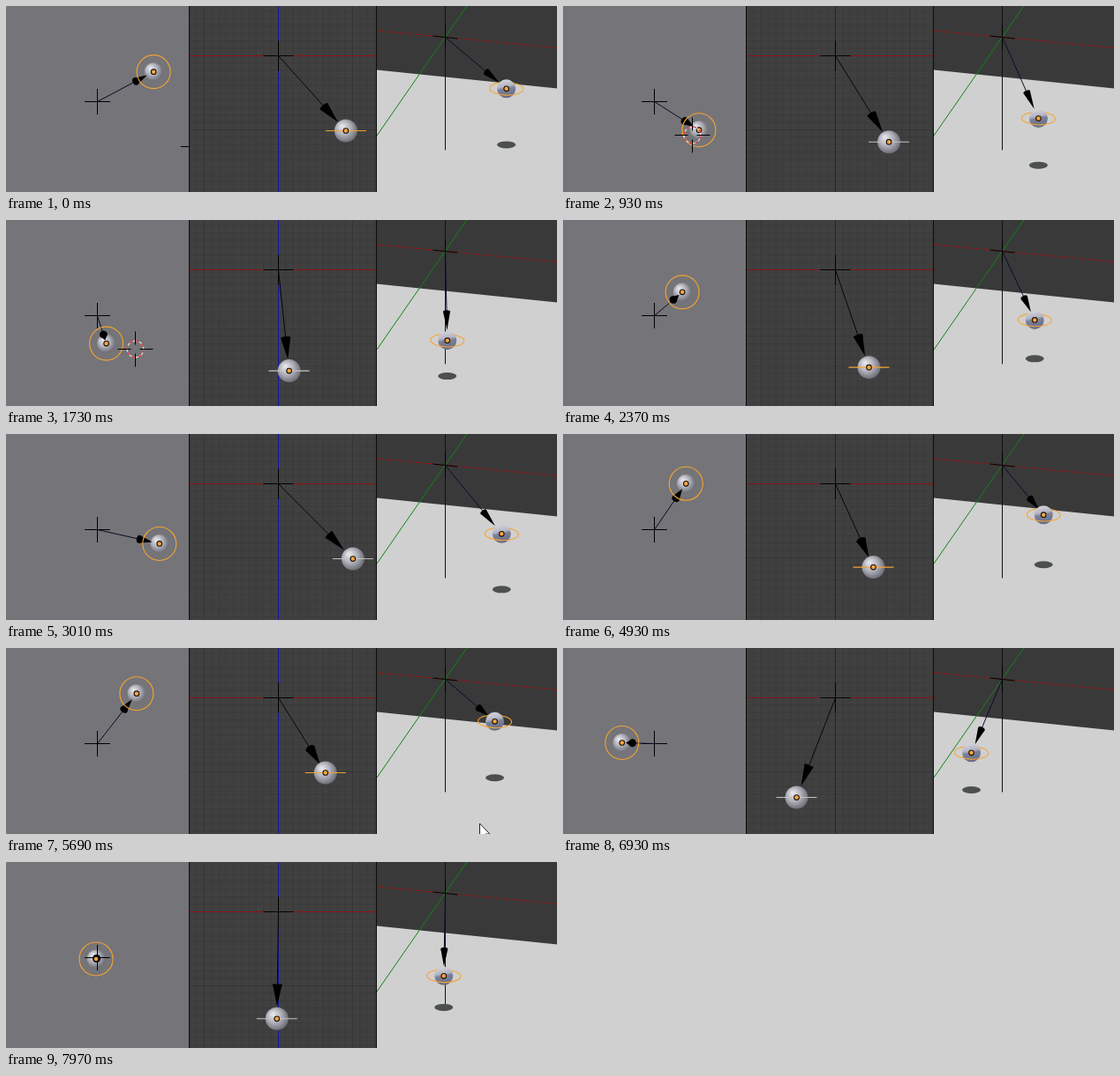
Write an HTML page with a canvas that moves like this. It is 624x211 px and loops after 8 s.

```html
<!DOCTYPE html>
<html lang="en">
<head>
<meta charset="utf-8">
<title>Precessing pendulum in three views</title>
<style>
html, body { margin: 0; width: 100%; height: 100%; overflow: hidden; background: #393939; }
canvas { display: block; }
</style>
</head>
<body>
<canvas id="stage" width="624" height="211"></canvas>
<script>
const ctx = document.getElementById('stage').getContext('2d');
const LOOP = 8000, TAU = Math.PI * 2, RAD = Math.PI / 180;
const LENGTH = 121.3, TILT = 22.75 * RAD, TOP_SCALE = 1 / 1.2;
const ORANGE = '#f5a432';

// [seconds, degrees]: heading of the tilted axis, and spin of the ball about it
const HEADING = [[.17, -28], [.6, -11], [1.1, -4], [1.73, 6], [2.45, 20], [3.01, 14.4],
  [3.6, 9], [4.17, 15], [4.75, -13], [5.14, -33], [5.69, -52], [5.97, -63],
  [6.42, -86], [6.93, -115], [7.5, -126], [7.97, -136]];
const SPIN = [[.17, 0], [1.73, -591], [3.01, -1083], [4.17, -1560], [5.69, -2160],
  [6.93, -2643], [7.97, -3057]];

// Smooth curve through keys (cubic Hermite)
function curve(keys, t) {
  const n = keys.length - 1;
  t = Math.min(Math.max(t, keys[0][0]), keys[n][0]);
  let i = 0;
  while (i < n - 1 && t > keys[i + 1][0]) i++;
  const slope = k => {
    const a = keys[Math.max(k - 1, 0)], b = keys[Math.min(k + 1, n)];
    return (b[1] - a[1]) / (b[0] - a[0]);
  };
  const [t0, v0] = keys[i], [t1, v1] = keys[i + 1];
  const d = t1 - t0, u = (t - t0) / d, w = 1 - u;
  return v0 * w * w * (1 + 2 * u) + v1 * u * u * (3 - 2 * u)
    + slope(i) * d * u * w * w - slope(i + 1) * d * u * u * w;
}

// Ball position: x right, y towards the viewer, z down
function ballAt(t) {
  const a = curve(HEADING, t) * RAD, s = curve(SPIN, t) * RAD;
  const si = Math.sin(TILT), co = Math.cos(TILT);
  const out = si * co * (1 + Math.cos(s)), side = si * Math.sin(s);
  return {
    x: LENGTH * (out * Math.cos(a) - side * Math.sin(a)),
    y: LENGTH * (out * Math.sin(a) + side * Math.cos(a)),
    z: LENGTH * (co * co - si * si * Math.cos(s))
  };
}

function line(x1, y1, x2, y2, color, width = 1, dash = []) {
  ctx.strokeStyle = color;
  ctx.lineWidth = width;
  ctx.setLineDash(dash);
  ctx.beginPath();
  ctx.moveTo(x1, y1);
  ctx.lineTo(x2, y2);
  ctx.stroke();
  ctx.setLineDash([]);
}

function poly(points, fill, stroke) {
  ctx.beginPath();
  points.forEach(p => ctx.lineTo(p[0], p[1]));
  ctx.closePath();
  ctx.fillStyle = fill;
  ctx.fill();
  if (stroke) {
    ctx.strokeStyle = stroke;
    ctx.lineWidth = 1;
    ctx.stroke();
  }
}

function oval(x, y, rx, ry, fill, stroke, turn = 0, from = 0, to = TAU) {
  ctx.beginPath();
  ctx.ellipse(x, y, rx, ry, turn, from, to);
  if (fill) { ctx.fillStyle = fill; ctx.fill(); }
  if (stroke) { ctx.strokeStyle = stroke; ctx.lineWidth = 1.1; ctx.stroke(); }
}

function cross(x, y, r, skew = 0) {
  line(x - r, y - skew, x + r, y + skew, '#000');
  line(x, y - r, x, y + r, '#000');
}

// Thin shaft and cone head; reach is the full projected length
function arrow(x, y, bx, by, w, reach, color) {
  const dx = bx - x, dy = by - y, len = Math.hypot(dx, dy) || 1;
  const ux = dx / len, uy = dy / len;
  const hx = x + dx * .676, hy = y + dy * .676;
  const flat = w * Math.sqrt(Math.max(0, 1 - (len / reach) ** 2));
  line(x, y, hx, hy, color);
  oval(hx, hy, flat, w, '#000', null, Math.atan2(dy, dx));
  poly([[hx - uy * w, hy + ux * w], [hx + uy * w, hy - ux * w],
    [x + dx * .884, y + dy * .884]], '#000');
}

function ball(x, y, r) {
  const g = ctx.createRadialGradient(x - r * .35, y - r * .4, r * .1, x - r * .1, y - r * .1, r * 1.15);
  g.addColorStop(0, '#e2e2e8');
  g.addColorStop(.5, '#b0b0ba');
  g.addColorStop(1, '#696973');
  oval(x, y, r, r, g);
}

function dot(x, y) {
  oval(x, y, 2.8, 2.8, '#f7a544', '#1a1208');
}

function panel(x, w, draw) {
  ctx.save();
  ctx.beginPath();
  ctx.rect(x, 0, w, 211);
  ctx.clip();
  draw();
  ctx.restore();
}

function cursor3d(x, y) {
  oval(x, y, 9.5, 9.5, null, '#eee');
  ctx.setLineDash([4, 3.5]);
  oval(x, y, 9.5, 9.5, null, '#d22');
  ctx.setLineDash([]);
  for (const s of [-1, 1]) {
    line(x + s * 5, y, x + s * 20, y, '#000');
    line(x, y + s * 5, x, y + s * 20, '#000');
  }
}

function topView(p, ms) {
  ctx.fillStyle = '#757478';
  ctx.fillRect(0, 0, 208, 211);
  const x = 103.5 + p.x * TOP_SCALE, y = 108.5 + p.y * TOP_SCALE;
  ball(x, y, 10.5);
  cross(103.5, 108.5, 14.5);
  arrow(103.5, 108.5, x, y, 4.5, LENGTH * TOP_SCALE, '#0a0a22');
  oval(x, y, 19, 19, null, ORANGE);
  dot(x, y);
  if (ms < 850) cursor3d(218, 159.5);
  else if (ms < 2350) cursor3d(146.5, 146.5);
}

function frontView(p) {
  ctx.fillStyle = '#404040';
  ctx.fillRect(208, 0, 212, 211);
  for (let i = -14; i < 20; i++) {
    const c = i % 10 ? '#3b3b3b' : '#363636', d = i * 8.4;
    line(308.5 + d, 0, 308.5 + d, 211, c);
    line(208, 56.5 + d, 420, 56.5 + d, c);
  }
  line(208, 56.5, 420, 56.5, '#8c1212');
  line(308.5, 0, 308.5, 211, '#1414a0');
  const x = 308.5 + p.x, y = 56.5 + p.z;
  cross(308.5, 56.5, 17);
  arrow(308.5, 56.5, x, y, 5.5, LENGTH, '#05050f');
  ball(x, y, 13);
  line(x - 23, y, x + 23, y, p.y < -4 ? ORANGE : '#c4c4c4', 1.1);
  dot(x, y);
}

function cameraView(p, ms) {
  ctx.fillStyle = '#393939';
  ctx.fillRect(420, 0, 204, 211);
  poly([[420, 72.5], [624, 93.5], [624, 211], [420, 211]], '#d0d0d0');
  const ox = 497.5, oy = 35.5, dx = p.x * TOP_SCALE, dy = p.y * TOP_SCALE;
  const x = ox + .961 * dx - .236 * dy;
  const y = oy + .77 * p.z + .09 * dx + .38 * dy;
  line(420, 28, 624, 47.5, '#941414', 1, [8, 3]);
  line(521.8, 0, 420, 147, '#148214');
  line(ox, 0, ox, 163.5, '#111');
  oval(x, 164.5 + .085 * dx + .37 * dy, 10.5, 4, '#4b504d');
  cross(ox, oy, 14, 1.5);
  arrow(ox, oy, x, y, 4, 112, '#0a0a30');
  oval(x, y, 19, 7.3, null, ORANGE, .03, Math.PI, TAU);
  const g = ctx.createLinearGradient(x - 2, y - 10, x + 2, y + 10);
  g.addColorStop(0, '#d2d2da');
  g.addColorStop(.36, '#b4b5c4');
  g.addColorStop(.5, '#7c8098');
  g.addColorStop(1, '#686c86');
  oval(x, y, 10.5, 10.5, g);
  oval(x, y, 19, 7.3, null, ORANGE, .03, 0, Math.PI);
  dot(x, y);
  if (ms >= 5570 && ms < 5850) {
    poly([[536.5, 199], [536.5, 215], [540, 212], [543, 218], [546, 216],
      [543, 211], [548, 211]], '#fff', '#222');
  }
}

function draw(now) {
  const ms = now % LOOP;
  const step = ms < 210 ? 170 : 210 + Math.floor((ms - 210) / 40) * 40;
  const p = ballAt(step / 1000);
  panel(0, 208, () => topView(p, step));
  panel(208, 212, () => frontView(p));
  panel(420, 204, () => cameraView(p, step));
  line(207.5, 0, 207.5, 211, '#0c0c0c');
  line(419.5, 0, 419.5, 211, '#0c0c0c');
}

const start = performance.now();
function tick() {
  draw(performance.now() - start);
  requestAnimationFrame(tick);
}
tick();
</script>
</body>
</html>
```
